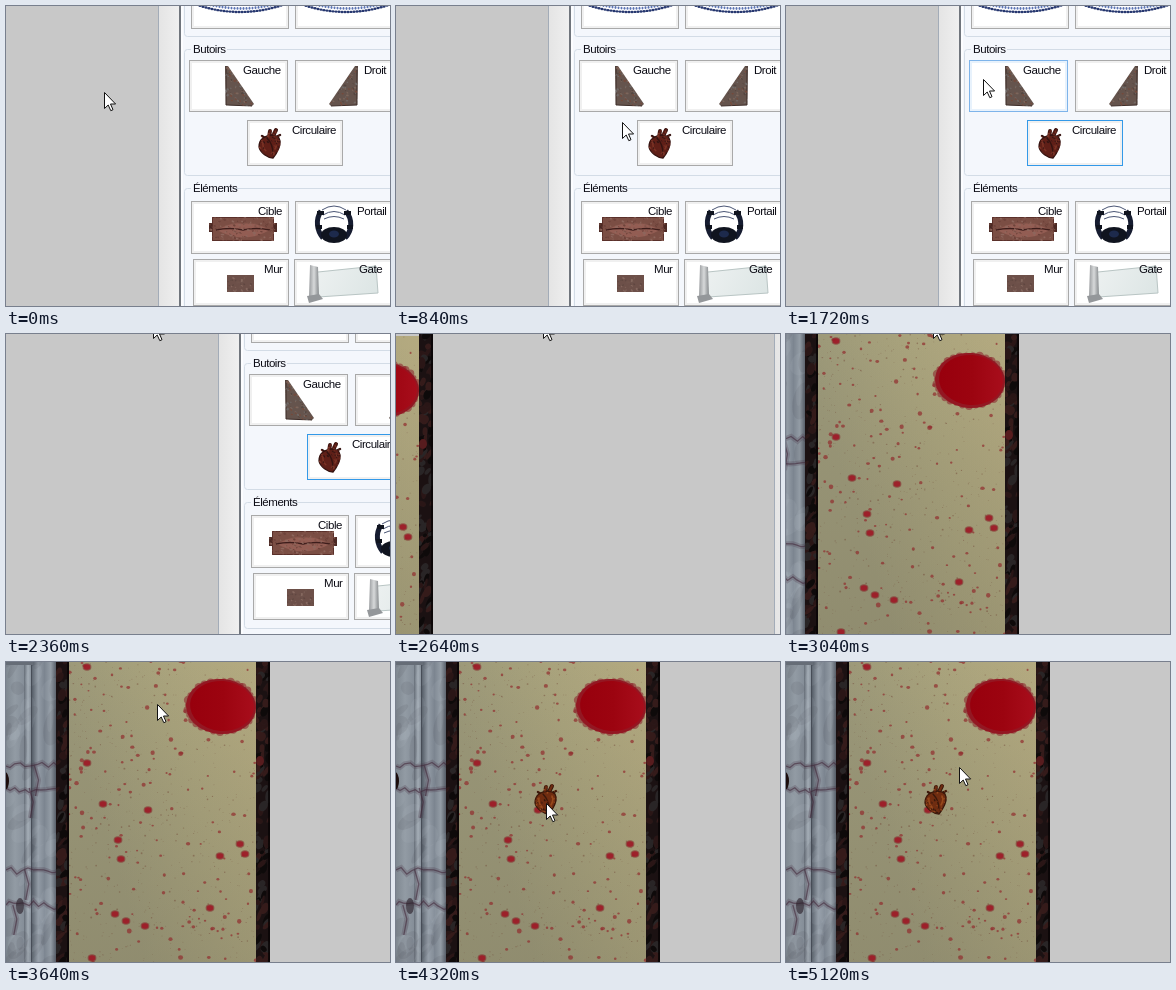
An HTML page with a canvas that plays this animation: 384x300 px, repeating every 5.28 s.

```html
<!DOCTYPE html>
<html lang="fr">
<head>
<meta charset="utf-8">
<title>Placement</title>
<style>
html, body { margin: 0; width: 100%; height: 100%; overflow: hidden; background: #c8c8c8; }
canvas { display: block; }
</style>
</head>
<body>
<canvas id="stage" width="384" height="300"></canvas>
<script>
const ctx = document.getElementById('stage').getContext('2d');
const LOOP = 5280, STEP = 40, TOP = 20;

// [time, x, y]; repeated places are rests
const cursorKeys = [
  [360, 98, 86], [920, 249, 122], [1040, 273, 132], [1520, 273, 132], [1720, 197, 73],
  [2080, 147, -12], [3440, 147, -12], [3640, 151, 42], [4000, 152, 112],
  [4160, 150, 141], [4960, 150, 141], [5120, 173, 105]
];
const panKeys = [[2160, 0, 0], [2360, 60, -14], [2640, 226, -40], [3040, 422, -49], [3200, 453, -51]];

function slope(keys, i, a) {
  const p = keys[i - 1], k = keys[i], n = keys[i + 1];
  const same = q => !q || (q[1] === k[1] && q[2] === k[2]);
  return same(p) || same(n) ? 0 : (n[a] - p[a]) / (n[0] - p[0]);
}

// Smooth path through the keys, at rest before the first and after the last
function track(keys, t) {
  const last = keys.length - 1;
  t = Math.min(Math.max(t, keys[0][0]), keys[last][0]);
  let i = 0;
  while (i < last - 1 && t >= keys[i + 1][0]) i++;
  const d = keys[i + 1][0] - keys[i][0], u = (t - keys[i][0]) / d, s = u * u * (3 - 2 * u);
  return [1, 2].map(a => Math.round(
    keys[i][a] * (1 - s) + keys[i + 1][a] * s +
    u * (1 - u) * d * ((1 - u) * slope(keys, i, a) - u * slope(keys, i + 1, a))));
}

function rng(seed) {
  return () => {
    seed = (seed * 1664525 + 1013904223) >>> 0;
    return seed / 4294967296;
  };
}

function layer(w, h, draw) {
  const c = document.createElement('canvas');
  c.width = w;
  c.height = h;
  draw(c.getContext('2d'));
  return c;
}

function rect(g, color, x, y, w, h) {
  g.fillStyle = color;
  g.fillRect(x, y, w, h);
}

function shape(g, color, d) {
  g.fillStyle = color;
  g.fill(new Path2D(d));
}

function oval(g, color, x, y, rx, ry = rx, rot = 0) {
  g.fillStyle = color;
  g.beginPath();
  g.ellipse(x, y, rx, ry, rot, 0, 7);
  g.fill();
}

function curve(g, color, width, d) {
  g.strokeStyle = color;
  g.lineWidth = width;
  g.stroke(new Path2D(d));
}

function fade(g, x0, y0, x1, y1, ...colors) {
  const f = g.createLinearGradient(x0, y0, x1, y1);
  colors.forEach((c, i) => f.addColorStop(i / (colors.length - 1), c));
  return f;
}

// Random flecks that stay on what is already painted
function grain(g, seed, n, w, h, colors, size, tall = 1) {
  const r = rng(seed);
  g.save();
  g.globalCompositeOperation = 'source-atop';
  for (let i = 0; i < n; i++)
    oval(g, colors[i % colors.length], r() * w, r() * h, size * (0.4 + r()), tall * size * (0.3 + r() * 0.6), r());
  g.restore();
}

function textured(g, x, y, w, h, colors, paint) {
  g.drawImage(layer(w, h, s => {
    paint(s);
    grain(s, x, w * h / 11, w, h, colors, 1.2);
  }), x, y);
}

function heart(g, x, y, main, dark, light) {
  textured(g, x, y, 26, 33, [dark, light, main], s => {
    s.lineCap = 'round';
    curve(s, dark, 4, 'M11 10 L12 4 M15 9 L18 3');
    curve(s, main, 2, 'M11 10 L12 4 M15 9 L18 3');
    curve(s, dark, 2.5, 'M18 10 L22 8 M7 11 L4 9');
    const body = 'M5 11 C9 8 17 7 21 11 C24 16 21 22 18 27 L15 31 C10 31 2 26 1 20 C1 15 2 13 5 11 Z';
    shape(s, main, body);
    curve(s, dark, 1.3, body);
    curve(s, dark, 1.4, 'M9 11 Q15 17 15 27');
    curve(s, light, 1.6, 'M5 15 Q4 20 8 24 M18 13 Q20 17 17 22');
  });
}

function label(g, s, x, y) {
  g.font = '11.5px "Liberation Sans", Arial, sans-serif';
  g.letterSpacing = '-0.45px';
  g.fillStyle = '#0b0b14';
  g.fillText(s, x, y);
}

function group(g, s, y, h) {
  g.strokeStyle = '#d3dce6';
  g.lineWidth = 1;
  g.beginPath();
  g.roundRect(178.5, y + 0.5, 230, h, 3);
  g.stroke();
  rect(g, '#f4f7fc', 185, y - 2, s.length * 5 + 1, 6);
  label(g, s, 187, y + 4);
}

function frameButton(g, [x, y, w, h], border, fill) {
  g.lineWidth = 2;
  g.strokeStyle = fill;
  g.strokeRect(x + 2, y + 2, w - 4, h - 4);
  g.lineWidth = 1;
  g.strokeStyle = border;
  g.strokeRect(x + 0.5, y + 0.5, w - 1, h - 1);
}

function button(g, ...box) {
  rect(g, '#fff', ...box);
  frameButton(g, box, '#a9a9a9', '#f0f0f0');
  return box;
}

let left, round;
const panel = layer(400, 380, g => {
  rect(g, fade(g, 152, 0, 173, 0, '#e4e4e4', '#efefef'), 152, 0, 22, 380);
  rect(g, '#a3acb8', 152, 0, 1, 380);
  rect(g, '#f4f7fc', 173, 0, 230, 380);
  rect(g, '#70757c', 173, 0, 2, 380);
  rect(g, '#fcfdff', 175, 0, 2, 380);
  group(g, '', -60, 90);
  group(g, 'Butoirs', 43, 126);
  group(g, 'Éléments', 182, 126);
  for (const y of [-30, 195]) {
    button(g, 185, y, 98, 53);
    button(g, 289, y, 100, 53);
  }
  left = button(g, 183, 54, 99, 52);
  button(g, 289, 54, 100, 52);
  round = button(g, 241, 114, 96, 46);
  button(g, 187, 253, 96, 47);
  button(g, 288, 253, 100, 47);

  // chains
  for (const cx of [234, 340])
    for (let i = -43; i <= 43; i += 3) {
      const y = 6 - i * i / 260;
      oval(g, '#26376f', cx + i, y, 1.6, 1.2);
      oval(g, '#5b74b4', cx + i + 1.5, y - 3.5, 1, 1.4);
    }

  const rust = ['#54453f', '#7d665b', '#6f6a68', '#74493a'];
  const wedge = s => {
    shape(s, '#65544d', 'M1 1 H4 L30 39 L28 41 L2 40 Z');
    curve(s, '#3c2c28', 1, 'M2 1 V40 L28 41');
  };
  textured(g, 218, 59, 32, 43, rust, wedge);
  textured(g, 321, 59, 32, 43, rust, s => {
    s.translate(32, 0);
    s.scale(-1, 1);
    wedge(s);
    s.resetTransform();
  });
  heart(g, 252, 121, '#5f1f17', '#341310', '#7b3325');

  // lips block
  textured(g, 203, 209, 68, 28, ['#6d4139', '#8d665c', '#7f5348'], s => {
    rect(s, '#4b2924', 0, 8, 68, 9);
    rect(s, '#7b4e44', 3, 2, 62, 24);
    shape(s, '#935d53', 'M8 15 Q24 6 34 9 Q44 6 61 15 Q34 30 8 15 Z');
    curve(s, '#3d1d1b', 1.5, 'M7 15 Q21 12 34 15 Q47 12 61 15');
    curve(s, '#5a302a', 1, 'M3.5 2.5 H64.5 V25.5 H3.5 Z');
  });

  // portal
  curve(g, '#161c30', 5, 'M315 205 C309 214 311 225 317 232 M340 205 C347 214 346 225 339 232');
  curve(g, '#4a5574', 1, 'M316 204 Q328 196 340 204 M317 209 Q328 202 339 209 M318 213 Q328 208 338 213');
  oval(g, '#10141f', 328, 229, 13, 8);
  oval(g, '#1d2a4c', 328, 228, 5, 3.5);
  curve(g, '#10141f', 4, 'M311 207 H318 M338 207 H345 M310 221 H316 M341 221 H347');

  textured(g, 221, 269, 27, 17, ['#5f4640', '#86685f', '#70544c'], s => rect(s, '#6d5049', 0, 0, 27, 17));

  // gate
  shape(g, fade(g, 310, 260, 372, 290, '#edf1f1', '#dce5e4'), 'M312 266 L370 260 L372 287 L312 291 Z');
  curve(g, '#b9c5c4', 1, 'M312 266 L370 260 L372 287 L312 291');
  shape(g, fade(g, 302, 0, 314, 0, '#8c8f92', '#d7d9da', '#74787b'), 'M304 259 L312 261 L313 290 L303 292 Z');
  shape(g, '#94979a', 'M301 290 L313 288 L317 293 L303 297 Z');

  label(g, 'Gauche', 237, 68);
  label(g, 'Droit', 358, 68);
  label(g, 'Circulaire', 286, 128);
  label(g, 'Cible', 252, 209);
  label(g, 'Portail', 351, 209);
  label(g, 'Mur', 258, 267);
  label(g, 'Gate', 353, 267);
});

function drop(g, x, y, s) {
  oval(g, 'rgba(132,44,44,.6)', x, y, s, s * 0.85);
  oval(g, 'rgba(160,24,38,.85)', x, y, s * 0.75, s * 0.6);
}

function border(g, x, w) {
  g.drawImage(layer(w, 340, s => {
    rect(s, '#1b1112', 0, 0, w, 340);
    grain(s, x, 110, w, 340, ['#2a1616', '#0e0a0a', '#351b1a', '#292526'], 3, 2.5);
    rect(s, 'rgba(8,4,4,.8)', w - 2, 0, 2, 340);
  }), x, -TOP);
}

function marble(g) {
  g.drawImage(layer(51, 340, s => {
    rect(s, fade(s, 0, 0, 18, 0, '#7f8891', '#929ba4', '#858e98'), 0, 0, 18, 340);
    rect(s, fade(s, 18, 0, 26, 0, '#666e78', '#a2abb4', '#79828c'), 18, 0, 8, 340);
    rect(s, fade(s, 26, 0, 51, 0, '#555d67', '#929ba5', '#7c8590', '#939ca5', '#4d545e'), 26, 0, 25, 340);
    grain(s, 8, 50, 51, 340, ['rgba(55,62,72,.1)', 'rgba(190,200,208,.1)'], 7, 3);
    rect(s, '#474d57', 25, 0, 1, 340);
    s.translate(0, TOP);
    rect(s, '#666d77', 0, 0, 27, 3);
    const r = rng(14);
    for (const y of [104, 126, 208, 243]) {
      let d = `M0 ${y}`, x = 0;
      while (x < 51) d += ` L${x += 3 + r() * 4} ${y + r() * 10 - 4}`;
      const branch = 5 + r() * 30;
      d += ` M${branch} ${y} l4 14 l-3 16`;
      curve(s, 'rgba(66,44,62,.22)', 5, d);
      curve(s, 'rgba(62,36,54,.55)', 1.3, d);
    }
    oval(s, 'rgba(38,26,36,.6)', 14, 244, 4, 8);
    oval(s, '#1c0d0c', -1, 119, 4, 9);
  }), 0, -TOP);
}

const table = layer(264, 340, g => {
  g.translate(0, TOP);
  marble(g);
  border(g, 50, 13);
  border(g, 250, 14);
  oval(g, '#571c1e', 254, 99, 4, 5);

  g.save();
  g.beginPath();
  g.rect(63, -9, 187, 340);
  g.clip();
  rect(g, fade(g, 250, 0, 63, 60, '#b4aa80', '#a8a27c', '#9a9778'), 63, -9, 187, 340);
  rect(g, fade(g, 0, 0, 0, 310, 'rgba(120,115,90,0)', 'rgba(120,115,90,.3)'), 63, -9, 187, 340);
  const r = rng(77);
  for (let i = 0; i < 750; i++) {
    const x = 63 + 187 * r() ** 1.2, y = r() * 320 - 9, s = 0.4 + 2.1 * r() ** 5;
    oval(g, s > 1 ? 'rgba(146,44,46,.7)' : 'rgba(116,76,58,.5)', x, y, s, s * (0.7 + r() * 0.4));
  }
  const large = [[81, 5], [81, 101], [97, 142], [142, 148], [112, 178], [234, 182], [214, 194],
    [239, 192], [115, 197], [204, 246], [109, 252], [120, 259], [139, 264], [86, 296]];
  for (const [x, y] of large) drop(g, x, y, 4.4);

  // pool with a ragged, half-clear rim
  for (let a = 0; a < 6.28; a += 0.2)
    oval(g, 'rgba(140,44,48,.6)', 215 + Math.cos(a) * 34, 44.5 + Math.sin(a) * 25.5, 2 + r() * 2.5);
  oval(g, '#931722', 215, 44.5, 35, 27.5, 0.08);
  oval(g, fade(g, 185, 0, 250, 0, '#98000d', '#9c0410', '#a80e1c'), 216, 44, 32, 25, 0.08);
  g.restore();
});

function cursor(x, y) {
  const p = new Path2D('M.5 .5 V16.5 L4.2 13 L6.8 18.7 L9 17.7 L6.5 12 H11.6 Z');
  ctx.save();
  ctx.translate(x, y);
  ctx.fillStyle = '#fff';
  ctx.strokeStyle = '#111';
  ctx.lineWidth = 1;
  ctx.fill(p);
  ctx.stroke(p);
  ctx.restore();
}

function drawPanel(t, dx, dy, cx, cy) {
  const over = ([x, y, w, h]) => dx === 0 && cx >= x && cx < x + w && cy >= y && cy < y + h;
  const focused = t >= 1320;
  ctx.save();
  ctx.translate(dx, dy);
  ctx.drawImage(panel, 0, 0);
  if (over(left)) frameButton(ctx, left, '#7eb4ea', '#e8f2fc');
  if (t >= 1240 && !focused) frameButton(ctx, round, '#569de5', '#cfe6fc');
  else if (over(round) || focused)
    frameButton(ctx, round, focused ? '#3399e8' : '#7eb4ea', over(round) ? '#e8f2fc' : '#f0f0f0');
  ctx.restore();
}

function render(now) {
  const t = Math.floor(now % LOOP / STEP) * STEP;
  const [dx, dy] = track(panKeys, t), [cx, cy] = track(cursorKeys, t);
  rect(ctx, '#c8c8c8', 0, 0, 384, 300);
  if (dx < 232) drawPanel(t, dx, dy, cx, cy);
  if (dx > 189) ctx.drawImage(table, dx - 453, dy + 51 - TOP);
  if (t >= 4320) heart(ctx, 138, 121, '#6f2c10', '#3a180b', '#97491c');
  cursor(cx, cy);
}

let start;
function tick(now) {
  start ??= now;
  render(now - start);
  requestAnimationFrame(tick);
}
render(0);
requestAnimationFrame(tick);
</script>
</body>
</html>
```
